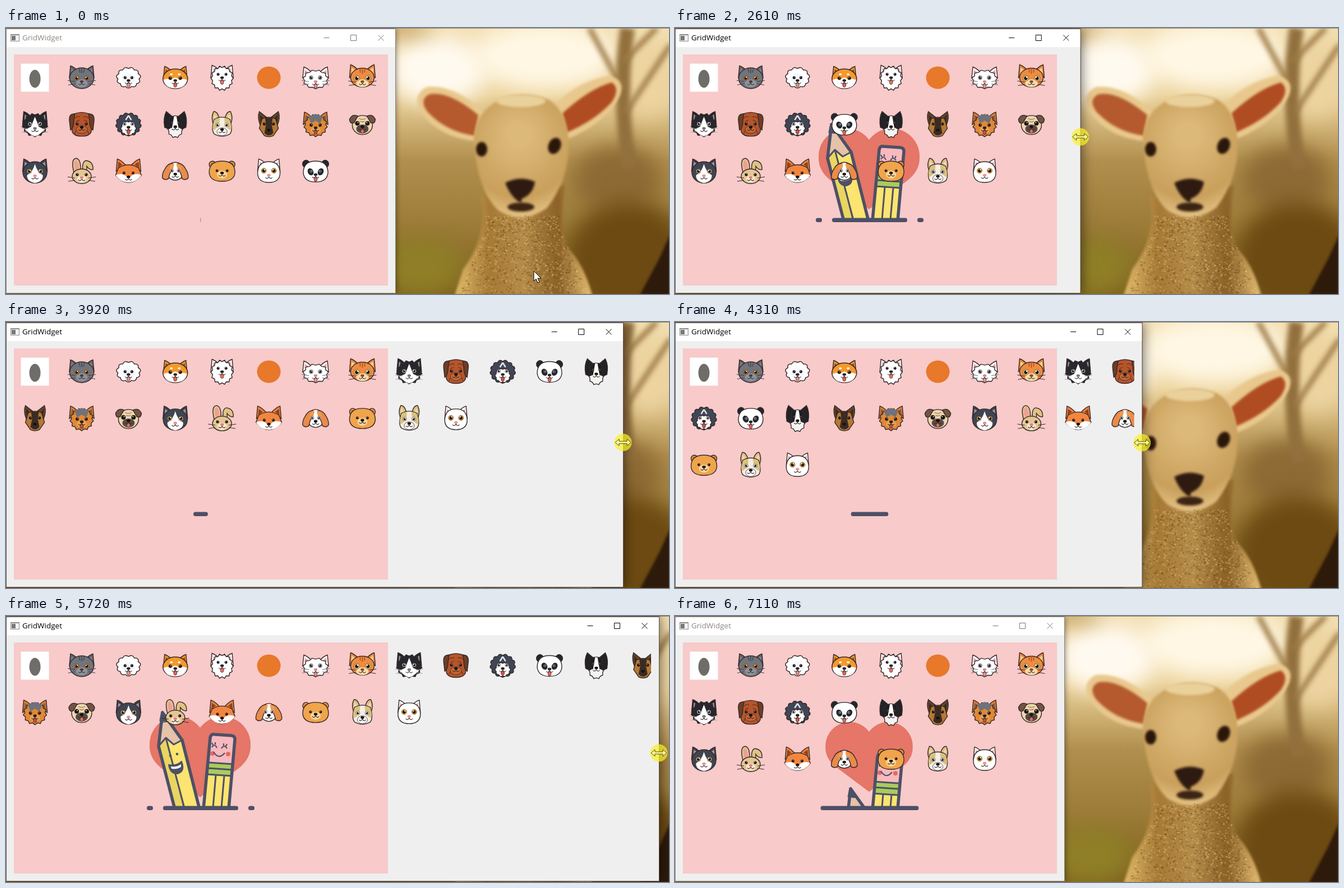
An HTML page with a canvas for the animation above (7190 ms loop, 1182x474 px).

```html
<!DOCTYPE html>
<html lang="en">
<head>
<meta charset="utf-8">
<title>GridWidget</title>
<style>
html, body { margin: 0; width: 100%; height: 100%; overflow: hidden; }
canvas { display: block; }
</style>
</head>
<body>
<canvas id="stage" width="1182" height="474"></canvas>
<script>
const LOOP = 7190, SCENE = 4200, CELL = 83.4;
const INK = '#33282a', SLATE = '#4d5066';
const stage = document.getElementById('stage');
let pen = stage.getContext('2d');

// Drawing helpers
function shape(d, fill, width = 1.4, line = INK) {
  const path = new Path2D(d);
  if (fill) { pen.fillStyle = fill; pen.fill(path); }
  if (width) { pen.lineWidth = width; pen.strokeStyle = line; pen.stroke(path); }
}
function oval(x, y, rx, ry, fill, width = 0, turn = 0) {
  pen.beginPath();
  pen.ellipse(x, y, rx, ry, turn, 0, 7);
  pen.fillStyle = fill;
  pen.fill();
  if (width) { pen.lineWidth = width; pen.strokeStyle = INK; pen.stroke(); }
}
function rect(x, y, w, h, fill) { pen.fillStyle = fill; pen.fillRect(x, y, w, h); }
function placed(x, y, sx, sy, draw) {
  pen.save();
  pen.translate(x, y);
  pen.scale(sx, sy);
  draw();
  pen.restore();
}
function twin(draw) { draw(); placed(0, 0, -1, 1, draw); }

// Face parts, centred on 0,0
function fur(y, rx, ry, tufts, fill, curly) {
  let d = '';
  for (let i = 0; i <= tufts * 2; i++) {
    const a = i * Math.PI / tufts, r = i % 2 ? 1 : 0.86;
    const k = curly && i % 2 ? 1.14 : r;
    const p = `${Math.sin(a) * rx * k} ${y - Math.cos(a) * ry * k}`;
    d += !i ? 'M' + p : curly ? (i % 2 ? 'Q' + p : ' ' + p) : 'L' + p;
  }
  shape(d + 'Z', fill);
}
function ears(x, y, fill, inner) {
  twin(() => {
    shape(`M${x + 2} 0L${x} ${y}Q${x - 7} ${y + 2} ${x - 16} ${y + 12}Z`, fill);
    shape(`M${x - 1} -6L${x - 2} ${y + 5}L${x - 9} ${y + 10}Z`, inner, 0);
  });
}
function eyes(x, y, r, iris = '#17120f') {
  twin(() => {
    oval(x, y, r, r, iris, 0.6);
    oval(x, y, r * 0.6, r * 0.65, '#17120f');
    oval(x - r * 0.3, y - r * 0.35, r * 0.25, r * 0.25, '#fff');
  });
}
function muzzle(y, nose = '#17120f', tongue) {
  if (tongue) oval(0, y + 8, 3, 4, tongue, 0.7);
  shape(`M-6 ${y + 4}Q-3 ${y + 8} 0 ${y + 3}Q3 ${y + 8} 6 ${y + 4}`, '', 1.1);
  oval(0, y, 3.2, 2.3, nose);
}
function whiskers(y, line) {
  twin(() => shape(`M12 ${y}L25 ${y - 2}M12 ${y + 4}L24 ${y + 6}`, '', 1, line));
}

const pets = {
  card() {
    rect(-25, -25, 50, 50, '#fff');
    oval(0, 2, 10, 16, '#6f6d67');
  },
  greyCat() {
    ears(20, -21, '#66686f', '#8f7f80');
    oval(0, 1, 21.5, 18.5, '#72747c', 1.4);
    shape('M-5 -17L-3 -9M0 -17V-8M5 -17L3 -9', '', 1.6, '#484a52');
    oval(0, 10, 10, 7, '#92949b');
    eyes(9, 1, 4, '#e58b2d');
    muzzle(7, '#4a3b3c');
    whiskers(7, '#3b3c42');
  },
  bichon() {
    fur(0, 22, 19, 11, '#fff', true);
    oval(0, 3, 12, 10, '#f5f7fa');
    eyes(6, 0, 2.4);
    muzzle(5, '#222', '#ef8a80');
  },
  shiba() {
    ears(19, -20, '#f09327', '#8c4a22');
    oval(0, 2, 22, 17.5, '#f4992c', 1.5);
    shape('M-21 4Q-12 0 -7 4Q0 -4 7 4Q12 0 21 4Q18 19 0 19Q-18 19 -21 4Z', '#fff', 0);
    twin(() => oval(7, -6, 2.6, 1.8, '#fff'));
    eyes(9, 1, 2.8);
    muzzle(5, '#222', '#ec5d4d');
  },
  samoyed() {
    ears(18, -22, '#fff', '#f4aeb4');
    fur(1, 20, 22, 14, '#fff');
    eyes(7, -6, 2.3);
    muzzle(0, '#222', '#ef6f63');
  },
  chipmunk() { oval(0, 0, 21, 20, '#e8782a'); },
  silkCat() {
    ears(21, -19, '#fff', '#ef9fa4');
    fur(3, 23, 17, 11, '#fff');
    eyes(8, 0, 3.4, '#aab4bd');
    muzzle(7, '#d98488', '#ee8f8b');
    whiskers(7, '#6c6f77');
  },
  orangeCat() {
    ears(21, -23, '#ef873b', '#f7d18b');
    oval(0, 0, 21, 17, '#f08c41', 1.4);
    shape('M-4 -16V-9M0 -17V-7M4 -16V-9', '', 1.8, '#b9561f');
    oval(0, 10, 11, 7, '#f9dcae');
    eyes(10, 1, 5, '#f5d783');
    muzzle(7, '#8d4524');
    whiskers(8);
  },
  blackCat() {
    ears(20, -23, '#26262a', '#99999e');
    fur(1, 23, 21, 13, '#28282c');
    shape('M0 -14L7 4L18 9L7 18L0 21L-7 18L-18 9L-7 4Z', '#fff', 0);
    eyes(9, -1, 3.5, '#d7dcdb');
    muzzle(7, '#777');
    whiskers(8, '#aaa');
  },
  mastiff() {
    shape('M-13 -19Q0 -24 13 -19Q19 -3 17 13Q14 21 0 21Q-14 21 -17 13Q-19 -3 -13 -19Z', '#b5552b');
    twin(() => {
      shape('M12 -19Q23 -20 22 -7L20 10Q14 7 14 -8Z', '#6f3d25');
      shape('M3 -13Q8 -16 12 -11M4 -8L10 -5M2 9Q11 8 13 18', '', 1.2, '#71301a');
    });
    eyes(8, -1, 2.4);
    oval(0, 9, 10, 7, '#c46637', 0.8);
    muzzle(5);
  },
  sheepdog() {
    fur(0, 23, 21, 13, '#414657', true);
    shape('M0 -16L-5 -8M0 -16L5 -8', '', 2.5, '#e7e9ee');
    fur(7, 14, 13, 10, '#fff', true);
    eyes(7, -1, 3, '#fff');
    muzzle(5, '#222', '#e34b43');
  },
  papillon() {
    fur(7, 14, 17, 10, '#f4f4f2');
    twin(() => shape('M4 -13L16 -23Q22 -12 19 5L12 8L5 4Z', '#232326'));
    shape('M-10 -12Q0 -19 10 -12L11 2L3 8V-13H-3V8L-11 2Z', '#1e1e21');
    shape('M-2 -15H2L6 7Q0 12 -6 7Z', '#fff', 0);
    eyes(6, -3, 2, '#806148');
    muzzle(4);
  },
  frenchie() {
    twin(() => {
      shape('M5 -12Q9 -24 15 -23Q20 -13 16 -2Z', '#dcc17e');
      shape('M9 -12L14 -19L15 -7Z', '#f4d4bd', 0);
    });
    shape('M-14 -9Q0 -17 14 -9Q20 10 14 17Q0 25 -14 17Q-20 10 -14 -9Z', '#f5eee0');
    twin(() => shape('M4 -11Q14 -12 15 -4Q19 8 14 10Q4 4 4 -11Z', '#dcc17e', 0));
    eyes(8, 1, 3.5, '#fff');
    oval(0, 13, 9, 7, '#fff', 0.8);
    muzzle(9);
  },
  shepherd() {
    twin(() => {
      shape('M3 -12L17 -23Q21 -12 15 2Z', '#65452a');
      shape('M9 -10L16 -18L15 -4Z', '#3a2a20', 0);
    });
    shape('M-12 -10Q0 -16 12 -10L17 7L8 20Q0 24 -8 20L-17 7Z', '#b67831');
    shape('M-7 -12H7L5 0L8 15Q0 24 -8 15L-5 0Z', '#3a2b23', 0);
    eyes(8, -1, 2.5);
    muzzle(10);
  },
  yorkie() {
    ears(20, -22, '#df7d2f', '#8a5a41');
    fur(2, 21, 20, 13, '#e08835');
    shape('M-13 -14L0 -19L13 -14L8 -2L0 -7L-8 -2Z', '#707279', 0);
    eyes(8, 1, 2.6);
    oval(0, 10, 9, 6, '#eca458');
    muzzle(6, '#222', '#c94c3f');
  },
  pug() {
    oval(0, 1, 18, 17, '#eed5ad', 1.4);
    twin(() => shape('M8 -15Q18 -20 23 -9Q22 0 15 -3Z', '#735443'));
    shape('M-6 -11Q0 -7 6 -11M-4 -6Q0 -3 4 -6', '', 1.2, '#92775c');
    oval(0, 8, 11, 8, '#594a45');
    eyes(9, -2, 3.8);
    muzzle(4, '#17120f', '#e66c60');
  },
  tuxedo() {
    ears(20, -22, '#3b404c', '#a3999e');
    oval(0, 2, 21.5, 19, '#404551', 1.4);
    shape('M0 -13Q4 2 14 7Q15 18 0 21Q-15 18 -14 7Q-4 2 0 -13Z', '#fff', 0);
    eyes(10, 0, 4, '#e7c478');
    muzzle(8, '#ed8d91');
  },
  rabbit() {
    shape('M-14 2Q-20 -22 -10 -23Q-1 -22 -2 0Z', '#e2bf8b');
    shape('M-11 -1Q-15 -18 -10 -19Q-5 -17 -5 -1Z', '#ef9e96', 0);
    shape('M2 0Q0 -18 8 -19Q21 -17 20 -3Q14 -2 9 -9L9 1Z', '#e2c283');
    oval(0, 9, 17, 13, '#e5c592', 1.4);
    oval(0, 14, 8, 6, '#f8ead4');
    eyes(8, 6, 2.4);
    muzzle(11, '#dd827d');
    whiskers(12);
  },
  fox() {
    ears(20, -22, '#ef7f37', '#8a4325');
    shape('M-18 -6Q0 -17 18 -6L23 7Q12 20 0 20Q-12 20 -23 7Z', '#f18640');
    twin(() => shape('M23 7Q12 2 4 9L0 13V20Q14 20 23 7Z', '#fff', 0));
    eyes(8, 3, 2.3);
    muzzle(10);
  },
  spaniel() {
    shape('M-13 -8Q-8 -16 0 -16Q8 -16 13 -8Q18 14 0 16Q-18 14 -13 -8Z', '#fff');
    twin(() => {
      shape('M5 -14Q13 -14 18 -5Q24 4 23 12Q19 17 12 13Q10 2 5 -4Z', '#e98b48');
      shape('M2 -14Q10 -15 11 0Q3 0 2 -14Z', '#ee9a55', 0);
    });
    eyes(6, -1, 3, '#fff');
    muzzle(5);
  },
  bear() {
    twin(() => { oval(17, -12, 6, 6, '#e8953a', 1.4); oval(17, -12, 3, 3, '#b6682a'); });
    shape('M0 -18Q23 -18 23 2Q22 18 0 18Q-22 18 -23 2Q-23 -18 0 -18Z', '#f0a44b');
    oval(0, 6, 9, 7, '#f9d59a');
    eyes(9, -1, 2.2);
    muzzle(3);
  },
  snowCat() {
    ears(18, -22, '#fff', '#f29f9b');
    shape('M0 -17Q20 -17 20 4Q19 20 0 20Q-19 20 -20 4Q-20 -17 0 -17Z', '#fff');
    eyes(9, -1, 4.5, '#f2a52f');
    muzzle(7, '#f0918e');
  },
  panda() {
    twin(() => oval(17, -13, 6.5, 7, '#23272e', 1));
    shape('M0 -18Q22 -18 22 3Q20 19 0 19Q-20 19 -22 3Q-22 -18 0 -18Z', '#fff');
    twin(() => oval(9, 1, 5, 6.5, '#23272e', 0, 0.5));
    eyes(8, 0, 2.2, '#fff');
    muzzle(6, '#222', '#ec6157');
  }
};

// Soft sunlit lamb behind the window, drawn once
function paintPhoto() {
  const sheet = document.createElement('canvas'), main = pen;
  sheet.width = 1182;
  sheet.height = 474;
  pen = sheet.getContext('2d');
  const sky = pen.createLinearGradient(0, 0, 0, 474);
  ['#f3dfb2', '#ecd39b', '#b18f4e', '#9b7b37', '#7d621d'].forEach((c, i) => sky.addColorStop(i / 4, c));
  rect(0, 0, 1182, 474, sky);
  pen.filter = 'blur(18px)';
  oval(770, 75, 90, 60, '#fffaf0');
  oval(960, 50, 130, 60, '#fff7e4');
  oval(1145, 90, 50, 70, '#ecd3a0');
  oval(700, 0, 60, 14, '#be9a56');
  oval(1090, 270, 80, 60, '#8d6a34');
  oval(1110, 410, 110, 100, '#6c4a12');
  oval(740, 425, 70, 50, '#8f7f27');
  pen.filter = 'blur(5px)';
  shape('M1112 250Q1090 120 1108 0', '', 26, '#92703d');
  shape('M1105 150L1185 30M1100 110L1040 0M1100 60L1160 0', '', 9, '#9d7a45');
  pen.filter = 'blur(2px)';
  shape('M1184 368L1165 410L1130 476H1184Z', '#2e1a0b', 0);
  const neck = pen.createLinearGradient(800, 0, 1045, 0);
  ['#e0b969', '#a67a35', '#b58b49', '#8b6127', '#e3bc72'].forEach((c, i) => neck.addColorStop(i / 4, c));
  shape('M846 300Q860 370 815 430L800 476H1045Q1030 420 1000 390Q985 350 998 280Z', neck, 0);
  shape('M852 150Q800 100 750 105Q722 120 740 150Q770 195 840 202Z', '#e9c88d', 0);
  shape('M842 155Q790 112 755 118Q735 128 752 150Q785 185 836 192Z', '#b45a2e', 0);
  shape('M980 135Q1020 95 1075 85Q1105 92 1095 120Q1070 170 1000 198Z', '#e9c88d', 0);
  shape('M992 152Q1040 108 1080 97Q1096 108 1080 132Q1050 165 1000 186Z', '#b04c22', 0);
  const face = pen.createRadialGradient(915, 190, 20, 915, 210, 130);
  face.addColorStop(0, '#dcb979');
  face.addColorStop(0.7, '#c99f5b');
  face.addColorStop(1, '#e6c588');
  shape('M834 200Q835 150 880 128Q920 110 968 128Q1003 150 1003 210Q1003 270 965 320Q920 352 878 325Q840 290 834 200Z', face, 0);
  oval(918, 130, 44, 11, '#ead09b');
  oval(848, 216, 10, 13, '#2b170a');
  oval(978, 210, 11, 15, '#2b170a', 0, 0.4);
  shape('M890 276Q916 262 943 274Q940 296 920 304L918 312Q900 302 890 276Z', '#2e1a10', 0);
  oval(918, 319, 24, 8, '#3b2414');
  pen.filter = 'none';
  let seed = 7;
  const random = () => (seed = seed * 16807 % 2147483647) / 2147483647;
  for (let i = 0; i < 900; i++) {
    const y = 335 + random() * 139, half = 68 + Math.max(0, y - 360) * 0.42;
    oval(923 + (random() * 2 - 1) * half, y, 1.6, 1.3, i % 2 ? '#f1cf8a55' : '#5f3f1555');
  }
  rect(0, 0, 1182, 1, '#8d8371');
  pen = main;
  return sheet;
}
const photo = paintPhoto();

// Timing
const clamp = v => Math.min(1, Math.max(0, v));
const ramp = (t, a, b) => clamp((t - a) / (b - a));
const easeOut = v => 1 - (1 - v) ** 3;
function track(keys, t) {
  let i = 1;
  while (i < keys.length - 1 && keys[i][0] < t) i++;
  const a = keys[i - 1], b = keys[i], k = ramp(t, a[0], b[0]);
  return a.slice(1).map((v, j) => v + (b[j + 1] - v) * k);
}

const widths = [[2370, 694], [2610, 722], [3080, 1061], [3310, 1126], [3560, 1172], [3860, 1142],
  [4310, 833], [4620, 709], [4780, 709], [5350, 1180], [5560, 1194], [5720, 1165], [6180, 694]];
const pointer = [[70, 941, 433], [320, 385, 178], [380, 385, 178], [620, 385, 262], [680, 390, 262],
  [830, 543, 254], [1220, 315, 144], [1450, 302, 165], [1650, 310, 175], [2200, 708, 194],
  [2340, 694, 194], [2610, 694, 194], [3310, 694, 214], [4310, 694, 215], [5720, 694, 244],
  [6250, 694, 244], [6850, 978, 398]];
const drags = [{ pet: 'frenchie', from: 370, to: 630 }, { pet: 'panda', from: 830, to: 1450 }];

// Pencils and heart
function drawPencils(left, right) {
  pen.save();
  pen.beginPath();
  pen.rect(240, 150, 210, 191);
  pen.clip();
  pen.lineJoin = 'round';
  placed(44 * left, 175 * left, 1, 1, () => {
    shape('M279 172L272 232L301 344H345L314 221Z', '#fbe46f', 0);
    shape('M272 232L285 217L319 344H301Z', '#ead560', 0);
    shape('M279 172L272 232L285 217L299 229L314 221Z', '#e6c2a8', 0);
    shape('M285 217L318 342M303 286L306 296M308 304L317 340', '', 3, SLATE);
    shape('M272 232L285 217L299 229L314 221', '', 3, SLATE);
    shape('M279 172L272 232L301 344H345L314 221Z', '', 5.5, SLATE);
    shape('M278 171L275 186L287 187Z', SLATE, 3, SLATE);
    oval(293, 249, 2.3, 2.3, SLATE);
    oval(305, 246, 2.3, 2.3, SLATE);
    shape('M290 265Q304 268 313 259Q320 277 306 281Q293 282 290 265Z', SLATE, 2, SLATE);
    shape('M294 268Q304 270 312 264L312 269Q304 274 295 272Z', '#fff', 0);
  });
  placed(-12 * right, 135 * right, 1, 1, () => {
    const body = 'M352 344L364 217Q365 210 372 211L402 213Q409 214 408 221L397 344Z';
    shape(body, '#fbe46f', 0);
    shape('M360 262L364 217Q365 210 372 211L402 213Q409 214 408 221L404 264Z', '#f7b9bd', 0);
    shape('M360 261L404 264L402 285L358 282Z', '#a9cb5d', 0);
    shape('M360 261L404 264M359 271L403 274M358 282L402 285M374 284L369 342M389 285L384 342', '', 3, SLATE);
    shape(body, '', 5.5, SLATE);
    oval(368, 245, 4, 4, '#e8685f');
    oval(396, 246, 4, 4, '#e8685f');
    shape('M370 242Q379 257 390 244M367 234Q372 226 376 235M384 236Q389 228 394 236M369 230L367 226M373 229V225M388 231V227M392 232L394 228', '', 2.2, SLATE);
  });
  pen.restore();
}
function drawScene(t) {
  const u = t % SCENE;
  const bar = Math.min(u * 0.6, 192, Math.max(0, (4096 - u) * 0.1475));
  const heart = easeOut(ramp(u, 300, 750)) * (1 - ramp(u, 2844, 3337));
  if (heart) placed(346, 252, heart, heart, () =>
    shape('M0 71L-68 20Q-90 3 -90 -20A50 50 0 0 1 0 -53A50 50 0 0 1 90 -20Q90 3 68 20Z', '#e57668', 0));
  const left = 1 - easeOut(ramp(u, 550, 950)) + ramp(u, 2700, 2972);
  const right = 1 - easeOut(ramp(u, 400, 750)) + ramp(u, 2840, 3120);
  drawPencils(left, right);
  const parts = bar > 190 ? [[251, 11], [280, 134], [432, 11]] : [[347 - bar / 2, bar]];
  pen.fillStyle = SLATE;
  for (const [x, w] of parts) {
    pen.beginPath();
    pen.roundRect(x, 338.5, w, 7.5, 3.5);
    pen.fill();
  }
}

function drawWindow(w, active) {
  pen.save();
  pen.shadowColor = active ? 'rgba(0,0,0,.55)' : 'rgba(0,0,0,.4)';
  pen.shadowBlur = active ? 20 : 9;
  pen.shadowOffsetX = 2;
  rect(0, 2, w, 470, '#efefef');
  pen.restore();
  rect(1, 2, w - 1, 32, '#fff');
  pen.lineWidth = 1;
  pen.strokeStyle = active ? '#594a3c' : '#8c8174';
  pen.strokeRect(0.5, 1.5, w, 471);
  rect(8, 11, 16, 13, '#8c8c8c');
  rect(9, 13, 14, 10, '#f3f3f3');
  rect(10, 14, 7, 8, '#777');
  pen.font = '13.5px "Open Sans", sans-serif';
  pen.textBaseline = 'middle';
  const tone = pen.fillStyle = active ? '#000' : '#8e8580';
  pen.fillText('GridWidget', 29, 18);
  placed(w - 0.5, 0.5, 1, 1, () =>
    shape('M-127 17H-117M-79 12H-69V22H-79ZM-30 12L-20 22M-20 12L-30 22', '', 1, active ? tone : '#777'));
  rect(14, 47, 667, 412, '#f8caca');
}

function drawPets(t, w) {
  const names = Object.keys(pets), cols = Math.floor((w + 14) / CELL);
  let held;
  for (const { pet, from, to } of drags) {
    if (t < from) continue;
    const [x, y] = track(pointer, Math.min(t, to));
    const slot = Math.floor((y - 47) / CELL) * 8 + Math.floor((x - 10) / CELL);
    names.splice(names.indexOf(pet), 1);
    names.splice(Math.min(slot, 22), 0, pet);
    if (t < to) held = pet;
  }
  pen.save();
  pen.beginPath();
  pen.rect(14, 47, w - 28, 412);
  pen.clip();
  names.forEach((name, i) => {
    if (name !== held)
      placed(51.6 + i % cols * CELL, 88.5 + Math.floor(i / cols) * CELL, 1, 1, pets[name]);
  });
  pen.restore();
  return held;
}

function drawPointer(t, w, held) {
  let [x, y] = track(pointer, t);
  const sizing = t > 2280 && t < 6250;
  if (sizing && t > 2340) x = w;
  if (held) placed(x + 10, y + 3, 1.27, 1.27, pets[held]);
  const pressed = held || t > 2340 && t < 6180;
  if (pressed) oval(x, y, 15.5, 15.5, 'rgba(250,240,40,.72)');
  placed(x, y, 1, 1, () => {
    if (sizing) shape('M-14 0L-7 -6V-2H7V-6L14 0L7 6V2H-7V6Z', pressed ? '#f8f59a' : '#fff', 1, '#55500f');
    else shape('M0 0V18L4 14L7 21L10 20L7 13H13Z', '#fff', 1, '#000');
  });
}

function draw(now) {
  const t = now % LOOP;
  const [w] = track(widths, t);
  pen.drawImage(photo, 0, 0);
  drawWindow(w, t > 250 && t < 7040);
  drawScene(t);
  const held = drawPets(t, w);
  if (t < 6900) drawPointer(t, w, held);
  requestAnimationFrame(frame);
}
const start = performance.now();
function frame() { draw(performance.now() - start); }
frame();
</script>
</body>
</html>
```
